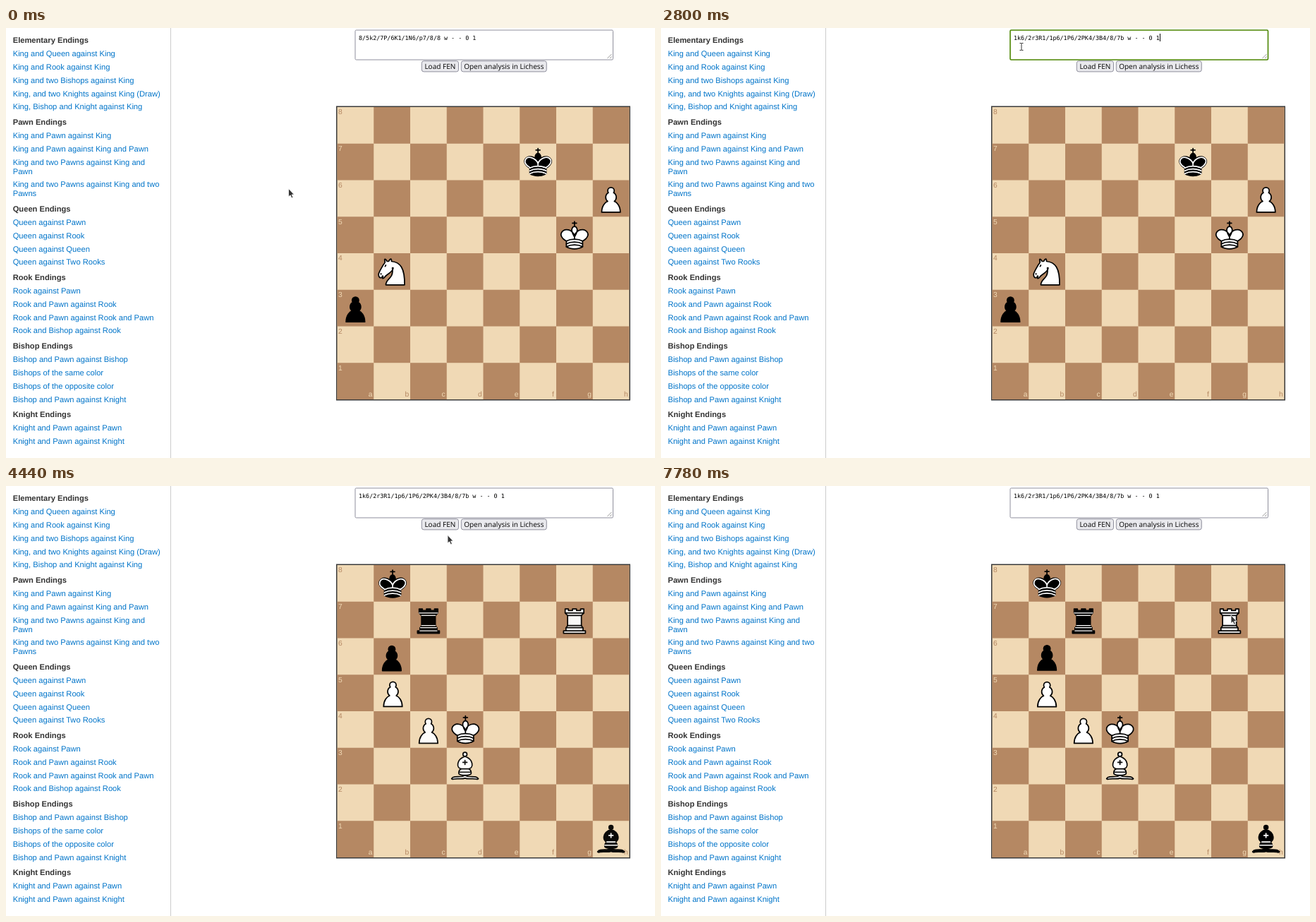
Animation, 920 px wide and 609 px high, one loop 8000 ms. Source, as an HTML page:

```html
<!DOCTYPE html>
<html lang="en">
<head>
<meta charset="utf-8">
<title>Chess endings</title>
<style>
html, body { margin: 0; width: 100%; height: 100%; overflow: hidden; background: #fff }
svg { display: block }
text { white-space: pre; text-rendering: geometricPrecision }
.nav { font: 11.16px "Liberation Sans", Arial, sans-serif; fill: #0074c9 }
.nav .head { font-weight: bold; fill: #333 }
.coord { font: 10.3px "Liberation Sans", Arial, sans-serif }
.fen { font: 8.4px "DejaVu Sans Mono", monospace }
.label { font: 10.05px "Open Sans", "Noto Sans", sans-serif }
.btn { fill: #e9e9ed; stroke: #8f8f9d }
</style>
</head>
<body>
<svg id="stage" width="920" height="609" viewBox="0 0 920 609"></svg>
<script>
const LOOP = 8000, CELL = 51.75, LEFT = 469.5, TOP = 112;
const LIGHT = '#f0d9b5', DARK = '#b58863', ACCENT = '#4b8501';
const FENS = ['8/5k2/7P/6K1/1N6/p7/8/8 w - - 0 1', '1k6/2r3R1/1p6/1P6/2PK4/3B4/8/7b w - - 0 1'];
const FEN_X = 500, CHAR = 5.057;

// "#" marks a heading, "|" a wrapped line
const NAV = `#Elementary Endings
King and Queen against King
King and Rook against King
King and two Bishops against King
King, and two Knights against King (Draw)
King, Bishop and Knight against King
#Pawn Endings
King and Pawn against King
King and Pawn against King and Pawn
King and two Pawns against King and|Pawn
King and two Pawns against King and two|Pawns
#Queen Endings
Queen against Pawn
Queen against Rook
Queen against Queen
Queen against Two Rooks
#Rook Endings
Rook against Pawn
Rook and Pawn against Rook
Rook and Pawn against Rook and Pawn
Rook and Bishop against Rook
#Bishop Endings
Bishop and Pawn against Bishop
Bishops of the same color
Bishops of the opposite color
Bishop and Pawn against Knight
#Knight Endings
Knight and Pawn against Pawn
Knight and Pawn against Knight`;

// Piece outlines and inner lines on a 45 unit square
const BODY = {
  p: 'M22.5 9c-2.21 0-4 1.79-4 4 0 .89.29 1.71.78 2.38C17.33 16.5 16 18.59 16 21c0 2.03.94 3.84 2.41 5.03-3 1.06-7.41 5.55-7.41 13.47h23c0-7.92-4.41-12.41-7.41-13.47 1.47-1.19 2.41-3 2.41-5.03 0-2.41-1.33-4.5-3.28-5.62.49-.67.78-1.49.78-2.38 0-2.21-1.79-4-4-4z',
  k: 'M22.5 11.6V6M20 8h5M22.5 25s4.5-7.5 3-10.5c0 0-1-2.5-3-2.5s-3 2.5-3 2.5c-1.5 3 3 10.5 3 10.5M12.5 37c5.5 3.5 14.5 3.5 20 0v-7s9-4.5 6-10.5c-4-6.5-13.5-3.5-16 4V27v-3.5c-2.5-7.5-12-10.5-16-4-3 6 6 10.5 6 10.5v7',
  r: 'M11 14V9h4v2h5V9h5v2h5V9h4v5l-3 3v12.5l1.5 2.5h.5v4h3v3H9v-3h3v-4h.5l1.5-2.5V17z',
  b: 'M9 36c3.4-1 10.1.4 13.5-2 3.4 2.4 10.1 1 13.5 2 0 0 1.7.5 3 2-.7 1-1.7 1-3 .5-3.4-1-10.1.5-13.5-1-3.4 1.5-10.1 0-13.5 1-1.4.5-2.3.5-3-.5 1.4-1.9 3-2 3-2zM15 32c2.5 2.5 12.5 2.5 15 0 .5-1.5 0-2 0-2 0-2.5-2.5-4-2.5-4 5.5-1.5 6-11.5-5-15.5-11 4-10.5 14-5 15.5 0 0-2.5 1.5-2.5 4 0 0-.5.5 0 2zM25 8a2.5 2.5 0 1 1-5 0 2.5 2.5 0 1 1 5 0z',
  n: 'M22 10c10.5 1 16.5 8 16 29H15c0-9 10-6.5 8-21M24 18c.4 2.9-5.6 7.4-8 9-3 2-2.8 4.3-5 4-1-.9 1.4-3 0-3-1 0 .2 1.2-1 2-1 0-4 1-4-4 0-2 6-12 6-12s1.9-1.9 2-3.5c-.7-1-.5-2-.5-3 1-1 3 2.5 3 2.5h2s.8-2 2.5-3c1 0 1 3 1 3'
};
const LINES = {
  p: '',
  k: 'M12.5 30c5.5-3 14.5-3 20 0m-20 3.5c5.5-3 14.5-3 20 0m-20 3.5c5.5-3 14.5-3 20 0',
  r: 'M11 14h23M14 17h17M14 29.5h17M12.5 32h20M12 36h21',
  b: 'M17.5 26h10M15 30h15m-7.5-14.5v5M20 18h5',
  n: 'M9 25.2v.6M14.9 14.8l-.8 1.4'
};
const RIM = 'M32 29.5s8.5-4 6-9.7C34.2 14 25 18 22.5 24.5v2.1-2.1C20 18 9.9 14 7 19.9c-2.5 5.6 4.9 9 4.9 9';

// piece, start square, end square ("-" for off the board)
const PIECES = 'k f7 b8,K g5 d4,P h6 b5,p a3 b6,N b4 -,r - c7,R - g7,P - c4,B - d3,b - h1'
  .split(',').map(s => s.split(' '));
const ANIM_START = 4218, ANIM_TIME = 234;

// Pointer moves: begin, end, x, y
const MOVES = [
  [0, 0, 400.5, 227.5], [220, 500, 614, 60], [880, 1040, 689.5, 13],
  [1200, 1800, 484, 25], [1800, 1940, 493, 26], [2220, 2380, 511, 26.5],
  [2920, 3000, 517, 22], [3120, 3440, 651, 14], [3620, 4000, 632, 52],
  [4300, 4440, 626, 69.5], [4440, 4840, 571, 233], [5240, 5240, 606, 206],
  [5440, 5440, 601, 204], [5760, 6000, 587, 273], [6180, 6380, 598, 332],
  [6560, 6880, 680, 470], [6880, 7380, 846, 109], [7380, 7780, 808, 183]
];

const $ = id => document.getElementById(id);
const clamp = (v, a, b) => Math.min(b, Math.max(a, v));
const between = (t, a, b) => t >= a && t < b;
const mix = (a, b, k) => a + (b - a) * k;
const ease = p => p < .5 ? 2 * p * p : 1 - 2 * (1 - p) ** 2;
const text = (x, y, s, attrs = '') => `<text x="${x}" y="${y}" ${attrs}>${s}</text>`;
const rect = (x, y, w, h, attrs) => `<rect x="${x}" y="${y}" width="${w}" height="${h}" ${attrs}/>`;
const square = s => [LEFT + (s.charCodeAt(0) - 97) * CELL, TOP + (8 - s[1]) * CELL];

function navigation() {
  let y = 2.2, out = '';
  NAV.split('\n').forEach(row => {
    const head = row[0] == '#';
    y += head && out ? 21.6 : 18.86;
    row.replace('#', '').split('|').forEach((line, i) => {
      if (i) y += 13;
      out += text(9.7, y.toFixed(2), line, head ? 'class="head"' : '');
    });
  });
  return `<g class="nav">${out}</g>` + rect(233, 0, 1, 609, 'fill="#ccc"');
}

function board() {
  let out = rect(LEFT, TOP, 8 * CELL, 8 * CELL, `fill="${LIGHT}" stroke="#3a3a3a" stroke-width="3"`)
    + rect(LEFT, TOP, 8 * CELL, 8 * CELL, `fill="${LIGHT}"`);
  for (let i = 0; i < 64; i++) {
    const c = i % 8, r = i >> 3;
    if ((c + r) % 2) out += rect(LEFT + c * CELL, TOP + r * CELL, CELL, CELL, `fill="${DARK}"`);
  }
  for (let i = 0; i < 8; i++) {
    const cls = `class="coord" fill="${i % 2 ? LIGHT : DARK}"`;
    const alt = `class="coord" fill="${i % 2 ? DARK : LIGHT}" text-anchor="middle"`;
    out += text(LEFT + 1.6, TOP + i * CELL + 10.3, 8 - i, cls)
      + text(LEFT + i * CELL + 47.2, 521.7, 'abcdefgh'[i], alt);
  }
  return out;
}

function piece([name], i) {
  const kind = name.toLowerCase(), black = name == kind;
  const ink = black ? '#fff' : '#000';
  return `<g id="piece${i}" stroke-width="1.5" stroke-linecap="round" stroke-linejoin="round">
    <path d="${BODY[kind]}" fill="${black ? '#000' : '#fff'}" stroke="#000"/>
    <path d="${LINES[kind] + (black && kind == 'k' ? RIM : '')}" fill="none" stroke="${ink}"
      stroke-width="${black && kind == 'r' ? 1 : 1.5}"/></g>`;
}

const button = (id, x, w, label) => rect(x, 46.7, w, 15.2, `id="${id}" class="btn" rx="3"`)
  + text(x + w / 2, 58.1, label, 'class="label" text-anchor="middle"');

$('stage').innerHTML = navigation()
  + rect(495, 3, 365.5, 42, 'id="box" fill="#fff" rx="1.5"')
  + '<path d="M852.5 43l6-6M856 43l2.5-2.5" stroke="#999" fill="none"/>'
  + rect(0, 8, 0, 11, 'id="selection"')
  + '<text class="fen" x="500" y="17"><tspan id="plain"></tspan><tspan id="marked"></tspan></text>'
  + rect(0, 8, 1, 11, 'id="caret"')
  + button('load', 589.3, 52.2, 'Load FEN') + button('open', 645.3, 121, 'Open analysis in Lichess')
  + board() + PIECES.map(piece).join('')
  + `<path id="arrow" d="M0 0V11.6L2.6 9.3 4.4 13.3 6.4 12.4 4.6 8.5H8z" fill="#333" stroke="#fff" stroke-width=".8"/>
     <path id="beam" d="M-2.5-5H-.6L0-4.5.6-5H2.5M0-4.5V4.5M-2.5 5H-.6L0 4.5.6 5H2.5" fill="none" stroke="#333"/>`;

function pointer(t) {
  let x, y;
  for (const [a, b, nx, ny] of MOVES) {
    if (t < a) break;
    const k = t >= b ? 1 : ease((t - a) / (b - a));
    x = k == 1 ? nx : mix(x, nx, k);
    y = k == 1 ? ny : mix(y, ny, k);
  }
  return [x, y];
}

const show = (id, on) => $(id).setAttribute('visibility', on ? 'visible' : 'hidden');
function set(id, attrs) {
  for (const k in attrs) $(id).setAttribute(k, attrs[k]);
}

function drawField(t, mouseX) {
  const fen = FENS[t < 2800 ? 0 : 1];
  const focus = between(t, 1040, 2380) || between(t, 2800, 4140);
  const selecting = between(t, 1220, 2800);
  const from = !selecting ? fen.length
    : t > 1800 ? 0 : clamp(Math.round((mouseX - FEN_X) / CHAR), 0, fen.length);
  const x = FEN_X + from * CHAR, end = FEN_X + fen.length * CHAR;
  $('plain').textContent = fen.slice(0, from);
  $('marked').textContent = fen.slice(from);
  set('marked', { fill: focus ? '#fff' : '#000' });
  set('selection', { x, width: end - x, fill: focus ? ACCENT : '#b0b0b0' });
  set('box', { stroke: focus ? ACCENT : '#8f8f9d', 'stroke-width': focus ? 1.6 : 1 });
  set('caret', { x: end - .4 });
  show('caret', focus && from == fen.length && t < 3700);
}

function drawPieces(t) {
  const p = clamp((t - ANIM_START) / ANIM_TIME, 0, 1), k = ease(p);
  PIECES.forEach(([, from, to], i) => {
    const [ax, ay] = square(from == '-' ? to : from);
    const [bx, by] = square(to == '-' ? from : to);
    set('piece' + i, {
      transform: `translate(${mix(ax, bx, k)} ${mix(ay, by, k)}) scale(1.15)`,
      opacity: from == '-' ? p : to == '-' ? Math.max(0, 1 - 1.7 * p) : 1
    });
  });
}

function draw(t) {
  const [x, y] = pointer(t);
  const inField = x > 495 && x < 861 && y > 2 && y < 45;
  const beam = inField || between(t, 1200, 2240);
  show('beam', beam);
  show('arrow', !beam);
  set(beam ? 'beam' : 'arrow', { transform: `translate(${x} ${y})` });
  const hover = between(t, 3880, 4400) && y > 46 && y < 62 && x < 641;
  $('load').style.fill = !hover ? '' : between(t, 4140, 4220) ? '#b1b1b9' : '#d0d0d7';
  drawField(t, x);
  drawPieces(t);
}

const start = performance.now();
function tick() {
  draw((performance.now() - start) % LOOP);
  requestAnimationFrame(tick);
}
tick();
</script>
</body>
</html>
```
